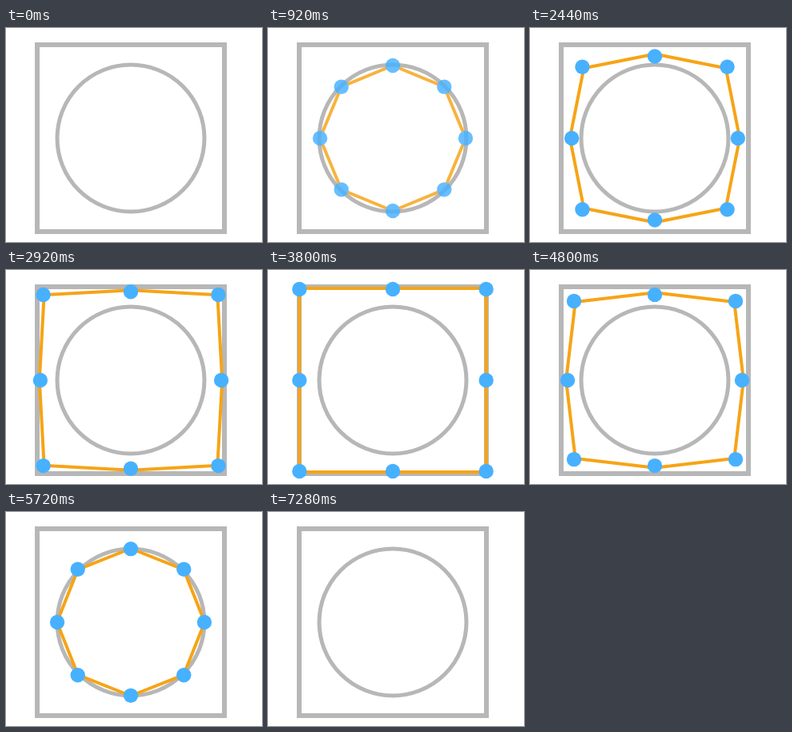
Recreate the animation shown at these times as an HTML page. Size 320 px wide and 268 px high, loop 7480 ms.

```html
<!DOCTYPE html>
<html lang="en">
<head>
<meta charset="utf-8">
<title>Circle to square</title>
<style>
  html, body { margin: 0; width: 100%; height: 100%; overflow: hidden; background: #fff; }
  svg { display: block; width: 100vw; height: 100vh; }
</style>
</head>
<body>
<svg viewBox="0 0 320 268">
  <g fill="none" stroke="#b7b7b7">
    <rect x="39" y="21" width="234" height="234" stroke-width="6"/>
    <circle cx="156" cy="138" r="92" stroke-width="5"/>
  </g>
  <g id="morph" opacity="0">
    <g id="edges" stroke="#f6a416" stroke-width="4"></g>
    <g id="dots" fill="#47b1ff"></g>
  </g>
</svg>
<script>
const LOOP = 7480;
const FADE_IN = [360, 1040], GROW = [1440, 3440];
const SHRINK = [4080, 5980], FADE_OUT = [6280, 6960];
const COUNT = 8, CX = 156, CY = 138, RADIUS = 91;
const HALF_W = 116.7, HALF_H = 114, EDGE_HALF_H = 115;

const morph = document.getElementById("morph");

function make(tag, parent) {
  const node = document.createElementNS("http://www.w3.org/2000/svg", tag);
  return document.getElementById(parent).appendChild(node);
}
function set(node, attrs) {
  for (const name in attrs) node.setAttribute(name, attrs[name]);
}

const mix = (a, b, p) => a + (b - a) * p;
const progress = (t, [from, to]) => Math.min(1, Math.max(0, (t - from) / (to - from)));

// cubic-bezier(.42, 0, .58, 1)
function ease(u) {
  let lo = 0, hi = 1;
  for (let i = 0; i < 20; i++) {
    const s = (lo + hi) / 2, r = 1 - s;
    const x = 1.26 * s * r * r + 1.74 * s * s * r + s * s * s;
    if (x < u) lo = s; else hi = s;
  }
  return lo * lo * (3 - 2 * lo);
}

const angleAt = i => i * 2 * Math.PI / COUNT;
const onCircle = i => ({
  x: CX + RADIUS * Math.cos(angleAt(i)),
  y: CY + RADIUS * Math.sin(angleAt(i))
});
const onSquare = (i, halfH) => ({
  x: CX + HALF_W * Math.round(Math.cos(angleAt(i))),
  y: CY + halfH * Math.round(Math.sin(angleAt(i)))
});

// an edge as its middle, length and direction
function span(a, b) {
  const dx = b.x - a.x, dy = b.y - a.y;
  return {
    x: (a.x + b.x) / 2, y: (a.y + b.y) / 2,
    length: Math.hypot(dx, dy), angle: Math.atan2(dy, dx)
  };
}

const dots = [], edges = [];
for (let i = 0; i < COUNT; i++) {
  const dot = make("circle", "dots");
  dot.setAttribute("r", 9.2);
  dots.push({ node: dot, from: onCircle(i), to: onSquare(i, HALF_H) });

  const from = span(onCircle(i), onCircle(i + 1));
  const to = span(onSquare(i, EDGE_HALF_H), onSquare(i + 1, EDGE_HALF_H));
  const gap = to.angle - from.angle;
  to.angle = from.angle + Math.atan2(Math.sin(gap), Math.cos(gap));
  edges.push({ node: make("line", "edges"), from, to });
}

function draw(t) {
  const p = ease(progress(t, GROW)) - ease(progress(t, SHRINK));
  for (const { node, from, to } of dots) {
    set(node, { cx: mix(from.x, to.x, p), cy: mix(from.y, to.y, p) });
  }
  for (const { node, from, to } of edges) {
    const x = mix(from.x, to.x, p), y = mix(from.y, to.y, p);
    const half = mix(from.length, to.length, p) / 2;
    const angle = mix(from.angle, to.angle, p);
    const dx = half * Math.cos(angle), dy = half * Math.sin(angle);
    set(node, { x1: x - dx, y1: y - dy, x2: x + dx, y2: y + dy });
  }
  morph.setAttribute("opacity", progress(t, FADE_IN) - progress(t, FADE_OUT));
}

const start = performance.now();
function tick() {
  draw((performance.now() - start) % LOOP);
  requestAnimationFrame(tick);
}
tick();
</script>
</body>
</html>
```
